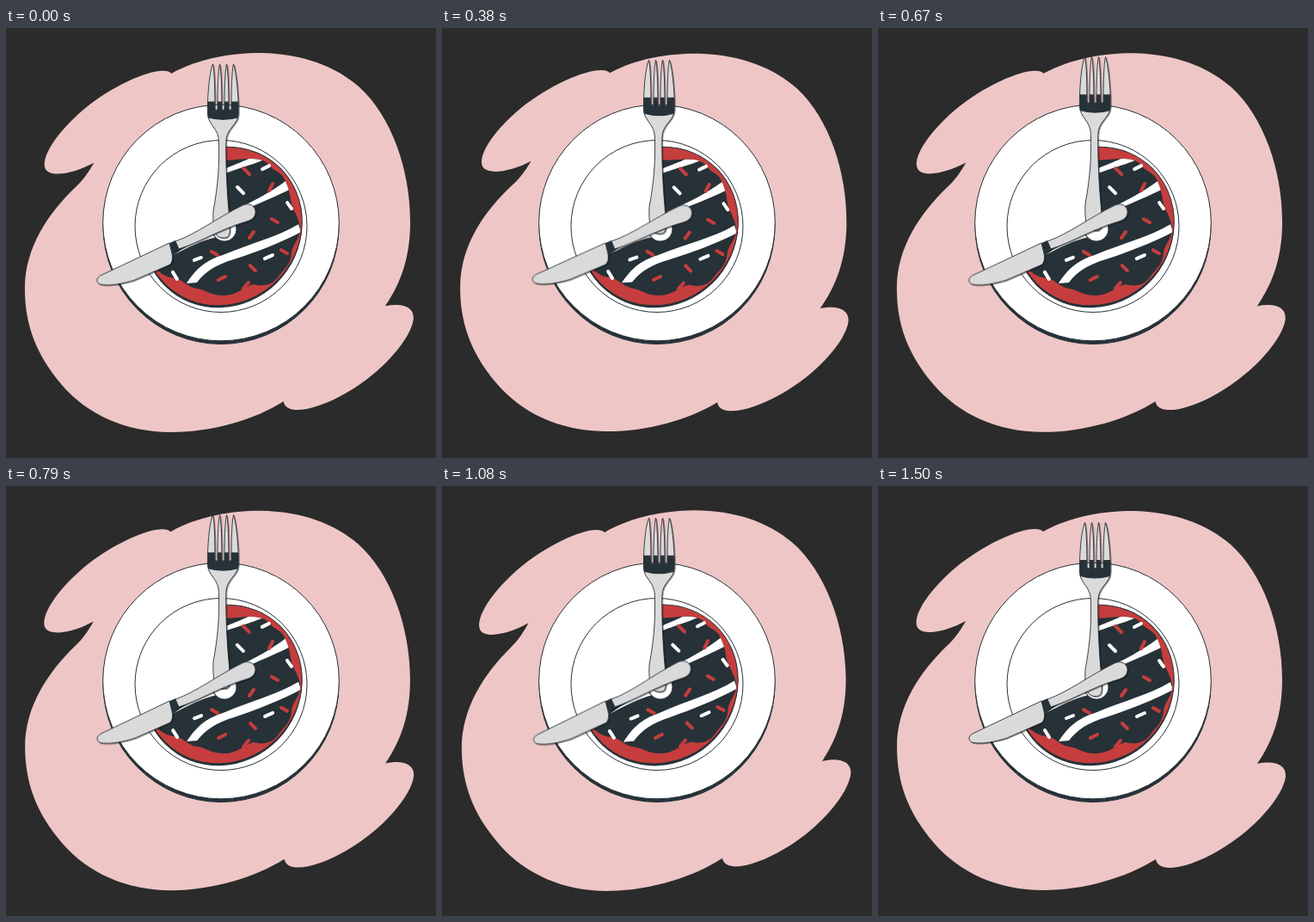
An HTML page that plays this animation: 500x500 px, repeating every 1540 ms.

```html
<!DOCTYPE html>
<html>
<head>
<meta charset="utf-8">
<style>
  html, body { margin: 0; width: 100%; height: 100%; overflow: hidden; background: #2b2b2b; }
  svg { display: block; width: 100vw; height: 100vh; }
  .steel { fill: #dadada; stroke: #263238; stroke-width: 0.9; stroke-linejoin: round; }
  .shadow { filter: drop-shadow(1.2px 1.2px 0 #0006); }
  .sprinkles { fill: none; stroke-width: 4; stroke-linecap: round; }
</style>
</head>
<body>
<svg viewBox="0 0 500 500">
  <defs>
    <clipPath id="wedge"><path d="M253 120H400V400H140V278L253 227Z"/></clipPath>
    <clipPath id="icingClip"><use href="#icing"/></clipPath>
    <clipPath id="forkClip"><use href="#forkShape"/></clipPath>
  </defs>

  <path id="blob" fill="#eec6c6" d="M192 53C225 35 262 29 296 29C345 30 382 44 410 68C448 102 470 165 470 225C470 265 460 295 441 323C460 319 475 323 474 338C471 361 438 400 396 424C360 445 326 451 323 434C290 455 240 470 192 470C140 470 95 450 65 415C35 380 22 345 22 303C22 255 50 215 80 186C90 177 97 166 102 157C80 169 55 174 47 166C38 155 55 125 90 95C130 62 182 42 192 53Z"/>

  <g stroke="#263238">
    <circle cx="250" cy="230.5" r="137" fill="#263238"/>
    <circle cx="250" cy="226.5" r="137.3" fill="#fff"/>
    <circle cx="250" cy="230.5" r="100" fill="#fff"/>
  </g>

  <g clip-path="url(#wedge)">
    <g id="donut">
      <ellipse cx="252" cy="233" rx="95" ry="89.5" transform="rotate(-45 252 233)" fill="#263238"/>
      <ellipse cx="252" cy="230.5" rx="95" ry="89.5" transform="rotate(-45 252 230.5)" fill="#c63d3d" stroke="#263238"/>
      <path id="icing" fill="#263238" d="M245 153C258 155 272 152 284 152C294 152 302 154 307 160C311 167 320 167 324 176C328 185 330 191 331 200C333 212 341 220 342 232C343 245 333 250 332 262C331 276 322 281 316 290C308 301 296 300 288 298C278 300 268 312 252 311C238 311 232 304 222 303C210 301 206 292 196 291C186 290 180 286 172 278L160 240L250 220Z"/>
      <g clip-path="url(#icingClip)" fill="#fff">
        <path d="M240 170C262 160 272 157 284 151L300 153C285 160 268 163 240 175Z"/>
        <path d="M262 213C285 203 306 192 326 177L331 187C305 200 285 207 262 218Z"/>
        <path d="M193 265C208 255 225 245 245 232V243C230 246 210 256 193 265Z"/>
        <path d="M210 297C220 282 230 271 252 264C285 250 315 243 340 228L343 237C318 250 292 260 265 269C245 275 232 283 222 296Z"/>
      </g>
      <circle cx="251" cy="227" r="17" fill="#c63d3d"/>
      <circle cx="254" cy="234" r="14" fill="#fff" stroke="#263238"/>
      <path class="sprinkles" stroke="#c63d3d" d="M276 163L283 170M306 189L310 181M309 222L316 226M283 244L288 237M239 260L246 264M320 258L327 262M284 276L290 282M247 293L255 289M282 296L276 303"/>
      <path class="sprinkles" stroke="#fff" d="M298 164L306 160M269 185L276 192M327 203L332 210M219 270L227 267M301 268L310 264M194 284L199 292"/>
    </g>
  </g>

  <g id="fork" class="shadow">
    <path id="forkShape" class="steel" d="M240.500 42C237 50 235 70 234.500 88V100C235 113 247.500 116 247.500 133C248 160 247 180 241 213C240 238 244 244 253 244S261 238 259 212C257 190 255.500 160 255.800 133C256 116 270 113 270.200 100V88C269.500 70 267.500 50 264.500 42C262.500 50 262 75 262 94Q260.500 97 259 94C259 75 258.500 50 256.500 42C254.500 50 254 75 254 94Q252.500 97 251 94C251 75 250.500 50 248.500 42C246.500 50 246 75 246 94Q244.500 97 243 94C243 75 242.500 50 240.500 42Z"/>
    <path clip-path="url(#forkClip)" fill="#263238" d="M230 85.500H275V103Q252 111 230 103Z"/>
  </g>

  <g id="knife" class="shadow">
    <path fill="#263238" d="M188 251L197 247L202 257L194 264Z"/>
    <path class="steel" d="M197 248C222 239 245 221 275 206C284 202 291 208 290 215C289 222 283 224 276 226C250 234 225 249 201 257Z"/>
    <path class="steel" d="M190 250L112 287C105 290 104 295 109 298C118 301 138 297 150 293L191 275Q195 270 193 262Z"/>
  </g>
</svg>
<script>
  const PERIOD = 1540, LEAD = 40;
  const part = id => document.getElementById(id);
  const [blob, donut, fork, knife] = ['blob', 'donut', 'fork', 'knife'].map(part);
  const move = (el, value) => el.setAttribute('transform', value);

  function draw(now) {
    const u = ((now + LEAD) / PERIOD) % 1;
    const lift = 1 - Math.abs(2 * u - 1);
    const angle = 4 * Math.abs((u + 0.75) % 1 - 0.5) - 1;
    move(blob, `rotate(${angle} 248 250)`);
    move(donut, `rotate(${angle} 252 231)`);
    move(knife, `rotate(${angle} 198 253)`);
    move(fork, `translate(0 ${0.5 - 9.6 * lift})`);
  }

  const start = performance.now();
  function tick() {
    draw(performance.now() - start);
    requestAnimationFrame(tick);
  }
  tick();
</script>
</body>
</html>
```
